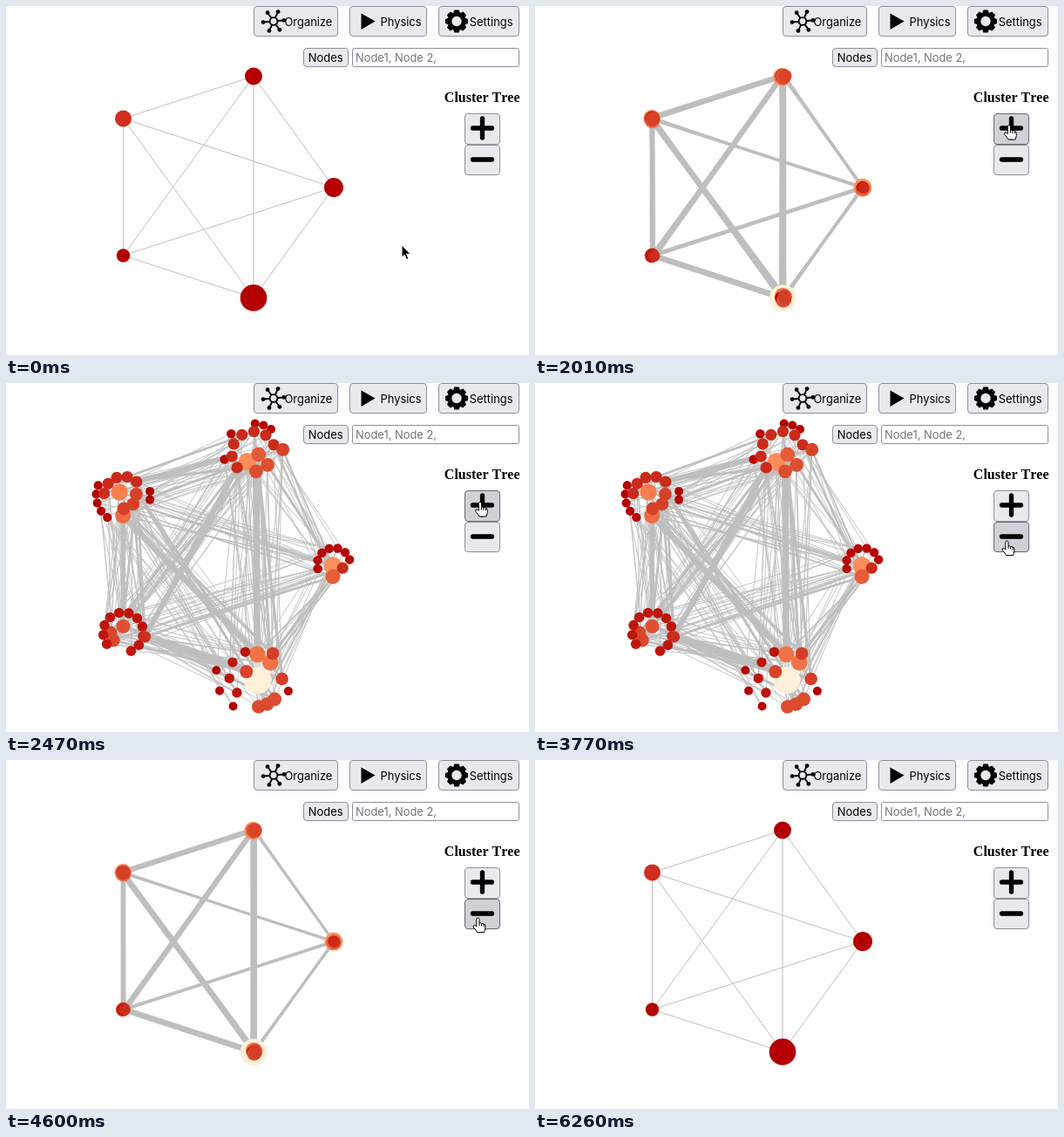
These frames come from a looping animation (600x400 px, 6610 ms). An HTML page with a canvas:

```html
<!DOCTYPE html>
<html lang="en">
<head>
<meta charset="utf-8">
<title>Cluster Tree</title>
<style>
  html, body { margin: 0; width: 100%; height: 100%; overflow: hidden; background: #fefefe; }
  canvas, svg { position: absolute; left: 0; top: 0; width: 600px; height: 400px; }
  text { font: 12.9px Inter, Roboto, sans-serif; fill: #000; }
  .box { fill: #e9e9ed; stroke: #8f8f9d; }
  .hover { fill: #d0d0d7; stroke: #676774; }
  .active { fill: #b1b1b9; stroke: #484851; }
  .sign { stroke: #000; stroke-width: 5.3; stroke-linecap: round; }
  .title { font: bold 16px "Liberation Serif", serif; font-kerning: none; }
</style>
</head>
<body>
<canvas id="graph" width="600" height="400"></canvas>
<svg viewBox="0 0 600 400">
  <rect class="box" x="284.5" y=".5" width="96" height="34" rx="3.5"/>
  <rect class="box" x="394.5" y=".5" width="88" height="34" rx="3.5"/>
  <rect class="box" x="496.5" y=".5" width="92" height="34" rx="3.5"/>
  <rect class="box" x="341.5" y="48.5" width="51" height="21" rx="3.5"/>
  <rect class="box" x="397.5" y="48.5" width="191" height="21" rx="2" style="fill:#fff"/>
  <rect class="box" id="plus" x="526.5" y="123.5" width="40" height="35" rx="3.5"/>
  <rect class="box" id="minus" x="526.5" y="159.5" width="40" height="34" rx="3.5"/>
  <path class="sign" d="M535.5 140H557.5M546.5 129V151M535.5 176H557.5"/>
  <g id="hub" stroke="#000" stroke-width="1.9"><circle cx="307" cy="17.5" r="4.4" fill="none"/></g>
  <path d="M407.5 8.5L423.5 17.5L407.5 27Z"/>
  <g id="gear"><circle cx="517" cy="17.5" r="8" fill="none" stroke="#000" stroke-width="4.6"/></g>
  <text x="319.5" y="22.7">Organize</text>
  <text x="429.5" y="22.7">Physics</text>
  <text x="531.8" y="22.7">Settings</text>
  <text x="346.8" y="63.8">Nodes</text>
  <text x="401" y="63.8" style="fill:#757575">Node1, Node 2,</text>
  <text class="title" x="589.5" y="110" text-anchor="end">Cluster Tree</text>
  <path id="arrow" stroke="#fff" d="M0 0V14.2L3.2 11.2L5.5 16.6L7.9 15.6L5.6 10.3H10Z"/>
  <path id="hand" fill="#fff" stroke="#000" stroke-linejoin="round"
    d="M-1.7 10V1.5Q-1.7 0 -.1 0Q1.5 0 1.5 1.5V6Q3 5 4 6.5Q5.7 5.6 6.5 7.2Q8.3 7 8.3 9V12Q8 14 7 16.5H-1Q-2 14.5 -5 11Q-6.3 8.5 -4 8.3Q-3 8.5 -1.7 10M1.5 6V9M4 6.5V9.5M6.5 7.2V9.7"/>
</svg>
<script>
const LOOP = 6610, STEP = 115;
const OPEN = 2010, CLOSE = 4360;
const $ = id => document.getElementById(id);
const ctx = $('graph').getContext('2d');
const polar = (x, y, radius, deg) => {
  const a = deg * Math.PI / 180;
  return { x: x + radius * Math.cos(a), y: y + radius * Math.sin(a) };
};

function add(parent, tag, attrs) {
  const el = document.createElementNS(parent.namespaceURI, tag);
  for (const k in attrs) el.setAttribute(k, attrs[k]);
  parent.append(el);
}

// toolbar icons
for (let deg = -125; deg < 235; deg += 60) {
  const tip = polar(307, 17.5, 12, deg), root = polar(307, 17.5, 5, deg);
  add($('hub'), 'circle', { cx: tip.x, cy: tip.y, r: 2.4, stroke: 'none' });
  add($('hub'), 'line', { x1: tip.x, y1: tip.y, x2: root.x, y2: root.y });
}
for (let deg = 0; deg < 360; deg += 45) {
  add($('gear'), 'path', { d: 'M-4 -9L-2.6 -13H2.6L4 -9Z', transform: `translate(517 17.5) rotate(${deg})` });
}

// a few equal nodes spread along an arc around the cluster's centre
const arc = (count, radius, size, from, to = from) => ({ count, radius, size, from, to });

function cluster(x, y, r, pull, arcs, color = '#b30000') {
  const kids = arcs.flatMap(a => Array.from({ length: a.count }, (_, i) => {
    const deg = a.from + (a.to - a.from) * i / Math.max(1, a.count - 1);
    return { ...polar(x, y, a.radius, deg), r: a.size };
  }));
  return { x, y, r, pull, color, kids };
}

const clusters = [
  cluster(284, 80.5, 10, 1, [
    arc(1, 12, 10.3, 126), arc(2, 34, 5.3, 168, 221), arc(3, 34, 5, 273, 306),
    arc(7, 25, 6.6, 139, 337), arc(1, 6, 8.4, 14), arc(2, 21, 7.9, 82, 40), arc(1, 34, 7.5, 353)]),
  cluster(134.5, 129, 9.5, .9, [
    arc(1, 6, 9.7, 222), arc(1, 23, 9, 91), arc(5, 31, 5.1, 126, 202),
    arc(2, 31, 5, -9, 9), arc(5, 22, 6.6, 186, 314), arc(3, 15, 7.4, -6, 88)], '#d02e1e'),
  cluster(134.5, 286, 7.7, .9, [
    arc(1, 7, 8, 270), arc(2, 14.5, 7.6, 180, 142), arc(11, 23, 5.8, 427, 145), arc(1, 25.5, 6.7, 11)]),
  cluster(284, 334.5, 15.3, 1.1, [
    arc(1, 8, 15.5, 52), arc(2, 24, 9.3, 280, 324), arc(1, 9, 7.5, 204), arc(4, 28, 5.7, 133, 250),
    arc(3, 43, 5, 123, 187), arc(1, 44, 5, 25), arc(3, 37, 7.8, 81, 49), arc(2, 33, 7.3, -48, 8)]),
  cluster(376, 208, 11, .4, [
    arc(1, 2, 10.5, 117), arc(1, 14, 8.5, 94), arc(7, 19, 5.2, 165, 343), arc(1, 11, 6.6, 22)])
];

let seed = 29;
const random = () => (seed = (seed * 16807) % 2147483647) / 2147483647;
const any = list => list[Math.floor(random() * list.length)];
const distance = (p, q) => Math.hypot(p.x - q.x, p.y - q.y);
const big = c => c.kids.filter(k => k.r > 6.5);
const nearest = (c, goal) => big(c).reduce((p, q) => distance(q, goal) < distance(p, goal) ? q : p);

// the larger of two random nodes, so hubs gather more links
function pick(c) {
  const p = any(c.kids), q = any(c.kids);
  return p.r > q.r ? p : q;
}

// every pair shares one trunk, a few strong links and many thin ones
const pairs = clusters.flatMap((a, i) => clusters.slice(i + 1).map(b => [a, b]));
const links = [];
for (const [a, b] of pairs) {
  const bond = a.pull * b.pull;
  links.push({ a, b, from: nearest(a, b), to: nearest(b, a), width: 7 * bond });
  for (let k = 0; k < 3; k++) links.push({ a, b, from: any(big(a)), to: any(big(b)), width: 1 + 2 * bond });
  for (let k = 0; k < 28 * bond; k++) links.push({ a, b, from: pick(a), to: pick(b), width: .9 });
}

// colour follows node size: red, orange, cream
const RED = [179, 0, 0], ORANGE = [252, 134, 82], CREAM = [254, 240, 217];
const mix = (a, b, u) => `rgb(${a.map((v, i) => Math.round(v + (b[i] - v) * u))})`;
const shade = r => r < 10 ? mix(RED, ORANGE, (r - 5) / 5) : mix(ORANGE, CREAM, (r - 10) / 5.5);

function line(p, q, width) {
  ctx.lineWidth = width;
  ctx.beginPath();
  ctx.moveTo(p.x, p.y);
  ctx.lineTo(q.x, q.y);
  ctx.stroke();
}

function dot(p, r, color) {
  ctx.fillStyle = color;
  ctx.beginPath();
  ctx.arc(p.x, p.y, r, 0, 7);
  ctx.fill();
}

function drawClosed() {
  for (const [a, b] of pairs) line(a, b, 1);
  for (const c of clusters) dot(c, c.r, c.color);
}

function drawOpen(p) {
  const place = (c, kid) => ({ x: c.x + (kid.x - c.x) * p, y: c.y + (kid.y - c.y) * p });
  for (const l of links) line(place(l.a, l.from), place(l.b, l.to), l.width);
  for (const c of clusters) for (const kid of c.kids) dot(place(c, kid), kid.r, shade(kid.r));
}

const clamp = u => Math.min(1, Math.max(0, u));
const smooth = u => { u = clamp(u); return u * u * (3 - 2 * u); };
const slowing = n => u => 1 - (1 - u) ** n;
const gaining = n => u => u ** n;
const stepsSince = (t, start) => Math.floor((t - start) / STEP);

// pointer glides, held for one step at a time
const glides = [
  { start: 600, steps: 9, to: [544, 136.5], easeX: slowing(1.4), easeY: slowing(1.8) },
  { start: 3190, steps: 6, to: [541.5, 181], easeX: smooth, easeY: smooth },
  { start: 5670, steps: 6, to: [602, 420], easeX: gaining(1.3), easeY: gaining(1.6) }
];

function pointerAt(t) {
  let x = 454, y = 274;
  for (const g of glides) {
    const u = clamp((stepsSince(t, g.start) + 1) / g.steps);
    x += (g.to[0] - x) * g.easeX(u);
    y += (g.to[1] - y) * g.easeY(u);
  }
  return [x, y];
}

function paintButton(id, top, bottom, x, y, pressed) {
  const over = x >= 526 && x <= 567 && y >= top && y < bottom;
  $(id).setAttribute('class', !over ? 'box' : pressed ? 'box active' : 'box hover');
  return over;
}

function render(t) {
  const opening = stepsSince(t, OPEN), closing = stepsSince(t, CLOSE);
  ctx.clearRect(0, 0, 600, 400);
  ctx.strokeStyle = '#bfbfbf';
  if (opening < 0 || closing > 3) drawClosed();
  else drawOpen(smooth((opening + .9) / 4.9) - smooth((closing + .55) / 3));

  const [x, y] = pointerAt(t);
  const pressed = (t >= 1890 && t < OPEN) || (t >= 4120 && t < CLOSE);
  const onPlus = paintButton('plus', 123, 159, x, y, pressed);
  const onMinus = paintButton('minus', 159, 194, x, y, pressed);
  const shown = onPlus || onMinus ? 'hand' : 'arrow';
  for (const id of ['arrow', 'hand']) {
    $(id).setAttribute('transform', `translate(${x} ${y})`);
    $(id).style.display = id === shown ? '' : 'none';
  }
}

const start = performance.now();
function loop() {
  render((performance.now() - start) % LOOP);
  requestAnimationFrame(loop);
}
loop();
</script>
</body>
</html>
```
